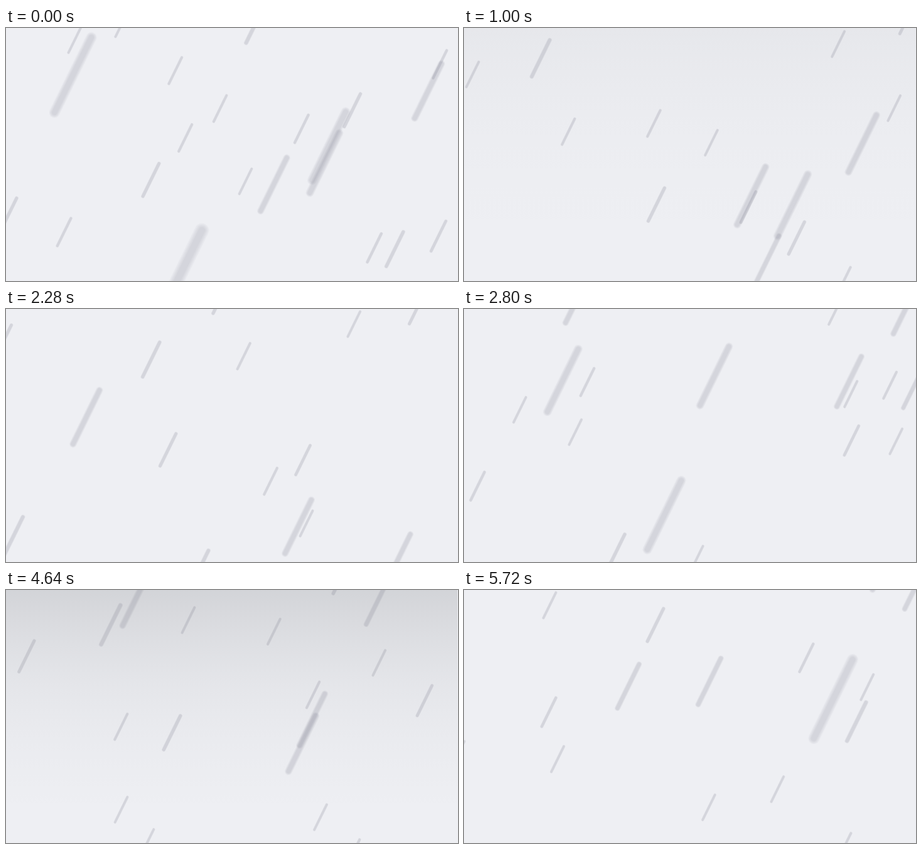
Recreate the animation shown at these times as an HTML page with a canvas. Size 720 by 404 pixels, loop 5800 ms.

```html
<!DOCTYPE html>
<html lang="en">
<head>
<meta charset="utf-8">
<title>Rain</title>
<style>
html, body { margin: 0; width: 100%; height: 100%; overflow: hidden; background: #eeeff3; }
canvas { display: block; width: 720px; height: 404px; }
</style>
</head>
<body>
<canvas id="stage" width="720" height="404"></canvas>
<script>
const W = 720, H = 404, LOOP = 5800, STEP = 40, LAST = 5720;
const COUNT = 290, LEAD = 700; // drops per loop, ms of rain before it starts
const LEAN = 0.49;   // sideways drift per pixel of fall
const SPEED = 0.018; // fall per ms for each pixel of streak height
const ctx = document.getElementById('stage').getContext('2d');

let seed = 7;
function random() {
  seed = (seed * 16807) % 2147483647;
  return seed / 2147483647;
}

// A drop has its upper end at x, y at the given time and a streak height h.
const drop = (time, x, y, h) => ({ time, x, y, h });

// The largest, nearest drops
const drops = [
  drop(0, 136, 15, 120),
  drop(0, 541, 134, 109),
  drop(0, 312, 323, 155),
  drop(1000, 657, 139, 91),
  drop(2800, 422, 60, 94),
  drop(2800, 346, 274, 110),
  drop(3760, 694, 71, 87),
  drop(5720, 619, 111, 126)
];

// Steady rain: evenly spread in time, mostly small and far away
for (let i = 0; i < COUNT; i++) {
  const h = 40 + 65 * random() ** 2.5;
  const time = (i + random()) / COUNT * (LAST + LEAD) - LEAD;
  drops.push(drop(time, random() * (W + 220), -h - 12, h));
}

function drawDrop(d, t) {
  const fall = (t - d.time) * SPEED * d.h;
  const x = d.x - fall * LEAN, y = d.y + fall;
  if (y > H + 12 || y + d.h < -12) return;
  const w = 0.11 * d.h - 0.5;
  const soft = 0.5 + Math.max(0, w - 5) * 0.3;
  ctx.beginPath();
  ctx.moveTo(x, y);
  ctx.lineTo(x - d.h * LEAN, y + d.h);
  // Layered widths soften the edges of near drops
  for (let k = -1.5; k <= 1.5; k++) {
    ctx.lineWidth = w + soft * k;
    ctx.stroke();
  }
}

// Storm shade, fading out towards the ground
const shade = ctx.createLinearGradient(0, 0, 0, H);
for (let u = 0; u <= 1; u += 0.125) {
  shade.addColorStop(u, `rgba(20,24,28,${0.125 * (1 - u) ** 2.2})`);
}

function pulse(t, mid, half) {
  const u = Math.abs(t - mid) / half;
  return u < 1 ? Math.cos(u * Math.PI / 2) ** 2 : 0;
}

function draw(t) {
  ctx.fillStyle = '#eeeff3';
  ctx.fillRect(0, 0, W, H);
  ctx.globalAlpha = 0.28 * pulse(t, 1000, 400) + pulse(t, 4640, 500);
  ctx.fillStyle = shade;
  ctx.fillRect(0, 0, W - 1, H);
  ctx.globalAlpha = 1;
  ctx.lineCap = 'round';
  ctx.strokeStyle = 'rgba(104,110,122,0.055)';
  drops.forEach(d => drawDrop(d, t));
}

const start = performance.now();
function tick() {
  const t = (performance.now() - start) % LOOP;
  draw(Math.min(Math.floor(t / STEP) * STEP, LAST));
  requestAnimationFrame(tick);
}
tick();
</script>
</body>
</html>
```
